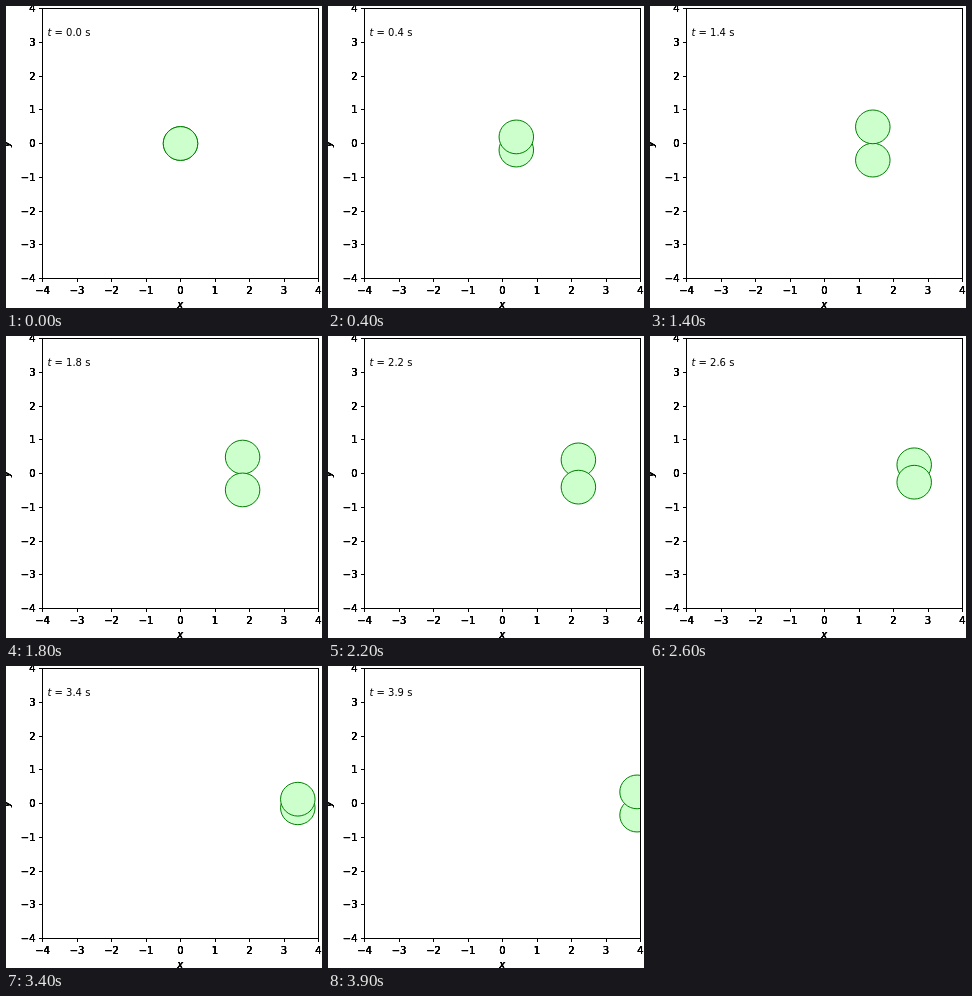
Write an HTML page that moves like this. It is 316 px wide and 302 px high and loops after 4000 ms.

```html
<!DOCTYPE html>
<html lang="en">
<head>
<meta charset="utf-8">
<title>Orbiting discs</title>
<style>
html, body { margin: 0; width: 100%; height: 100%; overflow: hidden; background: #fff; }
svg { display: block; }
text { font: 10px "DejaVu Sans", sans-serif; fill: #000; white-space: pre; }
.it { font-style: italic; }
.mid { text-anchor: middle; }
.end { text-anchor: end; }
ellipse { fill: #cfc; stroke: #008000; stroke-width: 1; }
#axes { fill: none; stroke: #000; stroke-width: 1; shape-rendering: crispEdges; }
</style>
</head>
<body>
<svg width="316" height="302" viewBox="0 0 316 302">
  <clipPath id="plot"><rect x="36.5" y="2.5" width="276" height="270"/></clipPath>
  <g id="discs" clip-path="url(#plot)">
    <ellipse rx="17.25" ry="16.875"/>
    <ellipse rx="17.25" ry="16.875"/>
  </g>
  <path id="axes"/>
  <g id="labels">
    <text class="it mid" x="174.3" y="301.5">x</text>
    <text class="it mid" transform="translate(4 138) rotate(-90)">y</text>
  </g>
  <!-- repeated layers give the labels their heavy edges -->
  <use href="#labels"/><use href="#labels"/><use href="#labels"/><use href="#labels"/>
  <text x="41.4" y="30"><tspan class="it">t</tspan> = <tspan id="clock">0.0</tspan> s</text>
</svg>
<script>
const LOOP = 4000, STEP = 100;
const $ = id => document.getElementById(id);
const px = x => 174.5 + 34.5 * x;
const py = y => 137.5 - 33.75 * y;
const snap = v => Math.floor(v) + 0.5;

function label(text, x, y, cls) {
  const el = document.createElementNS("http://www.w3.org/2000/svg", "text");
  el.setAttribute("x", x);
  el.setAttribute("y", y);
  el.setAttribute("class", cls);
  el.textContent = text;
  $("labels").append(el);
}

let axes = "M36.5 2.5H312.5V272.5H36.5Z";
for (let v = -4; v <= 4; v++) {
  const text = String(v).replace("-", "\u2212");
  axes += `M${snap(px(v))} 273V276M33 ${snap(py(v))}H36`;
  label(text, px(v), 288, "mid");
  label(text, 29.5, Math.round(py(v) + 3.6), "end");
}
$("axes").setAttribute("d", axes);

const [back, front] = $("discs").children;

function place(disc, x, y) {
  disc.setAttribute("cx", px(x));
  disc.setAttribute("cy", py(y));
}

function draw(now) {
  const t = Math.floor((now % LOOP) / STEP) * STEP / 1000;
  // the nearer disc swaps every half turn
  const y = 0.5 * Math.sin(t) * (Math.cos(t) < 0 ? -1 : 1);
  place(back, t, -y);
  place(front, t, y);
  $("clock").textContent = t.toFixed(1);
}

let start;
function tick(now) {
  start ??= now;
  draw(now - start);
  requestAnimationFrame(tick);
}
draw(0);
requestAnimationFrame(tick);
</script>
</body>
</html>
```
